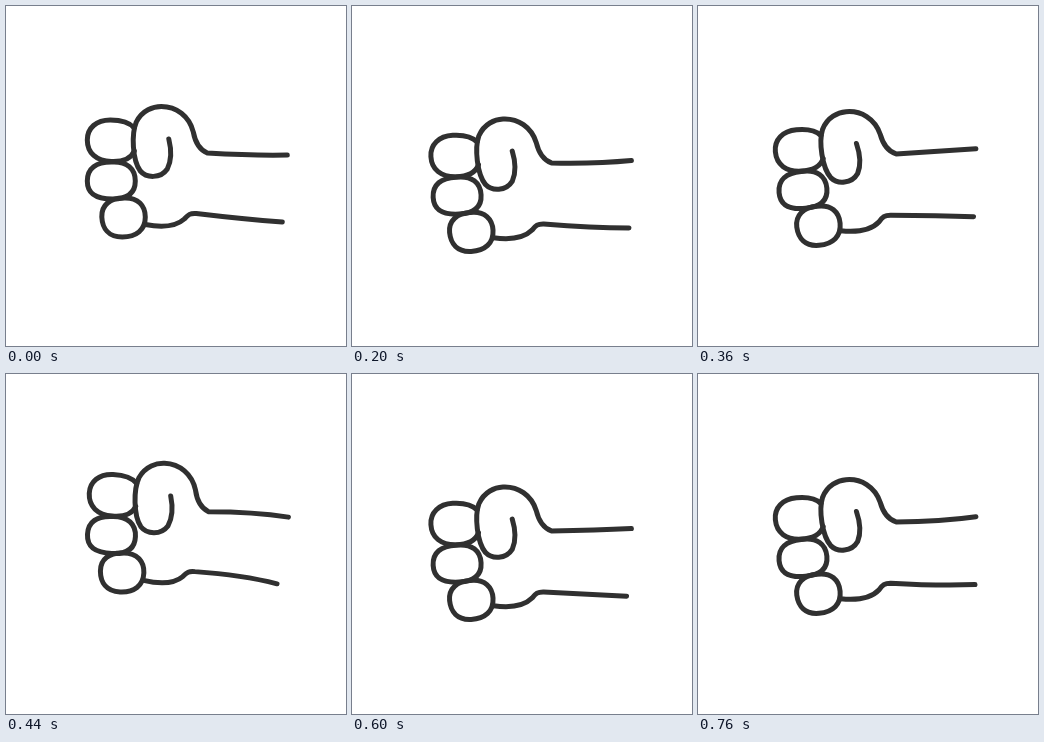
These frames come from a looping animation (340 px wide and 340 px high, 800 ms). An HTML page:

```html
<!DOCTYPE html>
<html lang="en">
<head>
<meta charset="utf-8">
<title>Knocking fist</title>
<style>
  html, body { margin: 0; width: 100%; height: 100%; overflow: hidden; background: #fff; }
  svg { display: block; width: 100vw; height: 100vh; }
  path { fill: none; stroke: #303030; stroke-width: 5; stroke-linecap: round; stroke-linejoin: round; }
</style>
</head>
<body>
<svg viewBox="0 0 340 340">
  <g id="hand">
    <path d="M128 122C122 115 112 114 104 114C90 114 81 122 81 134C81 147 90 155 105 155.5C117 156 125 152 128 145"/>
    <path d="M105 156C121 155 129 163 129 175C129 188 120 193 106 193C90 193 81 188 81 175C81 162 90 156 105 156Z"/>
    <path d="M117 192C132 191 139 200 139 211C139 224 130 231 116 231C102 231 96 222 95.5 211C95 199 104 192 117 192Z"/>
    <path id="upper"/>
    <path id="lower"/>
  </g>
</svg>
<script>
  const KNOCK = 400, LOOP = 2 * KNOCK, STEP = 40;
  const THUMB = 'M162.5 133C165 143 165.5 154 161 163C154 173 140 172 134 165C126 154 125 128 130 116' +
    'C136 104 147 100.5 155 100.5C170 100.5 183 110 187 126C189 137 194 144 201 147';
  const WRIST = 'M139 218.5C152 221 168 222 178 213C182 208.5 184 207 190 207.5';

  // One knock: time, height, angle
  const KEYS = [
    [0, 174, 0],
    [80, 151, 3.8],
    [160, 163, 2.7],
    [240, 217.5, -9.4],
    [280, 226, -9.8],
    [360, 183.5, -5.2]
  ];

  // Key by index, wrapping around the knock
  function key(i) {
    const n = KEYS.length, turn = Math.floor(i / n);
    const [t, ...v] = KEYS[i - turn * n];
    return { t: t + turn * KNOCK, v };
  }

  // Smooth cubic through the keys
  function pose(t) {
    const i = KEYS.findLastIndex(k => k[0] <= t);
    const [a, b, c, d] = [i - 1, i, i + 1, i + 2].map(key);
    const h = c.t - b.t, u = (t - b.t) / h, w = 1 - u;
    return b.v.map((p, j) => {
      const q = c.v[j];
      const m = h * (q - a.v[j]) / (c.t - a.t);
      const n = h * (d.v[j] - p) / (d.t - b.t);
      return w * w * (1 + 2 * u) * p + u * u * (3 - 2 * u) * q + u * w * (w * m - u * n);
    });
  }

  // Cosine that peaks at the given time
  const wave = (t, peak, period) => Math.cos(2 * Math.PI * (t - peak) / period);

  const [hand, upper, lower] = ['hand', 'upper', 'lower'].map(id => document.getElementById(id));

  function draw(now) {
    const t = Math.floor((now % LOOP) / STEP) * STEP;
    const [y, angle] = pose(t % KNOCK);
    const x = 105.3 + 0.08 * angle;

    // The forearm bows more on the second knock; its lower line slides with the first lift
    const bend = 0.9 * wave(t, 460, LOOP) + 1.2 * wave(t, 480, KNOCK);
    const slide = 7.5 * ((1 + wave(t, 90, LOOP)) / 2) ** 6 - 3.5;
    const drop = 0.02 * angle ** 2;

    hand.setAttribute('transform', `translate(${x} ${y}) rotate(${angle}) translate(-105 -174)`);
    upper.setAttribute('d', `${THUMB}Q246 ${148.8 - 2 * bend} 281 149`);
    lower.setAttribute('d', `${WRIST}Q238 ${212.4 - 2 * bend + drop / 2} ${276 + slide} ${216 + drop}`);
  }

  const start = performance.now();
  function tick() {
    draw(performance.now() - start);
    requestAnimationFrame(tick);
  }
  tick();
</script>
</body>
</html>
```
